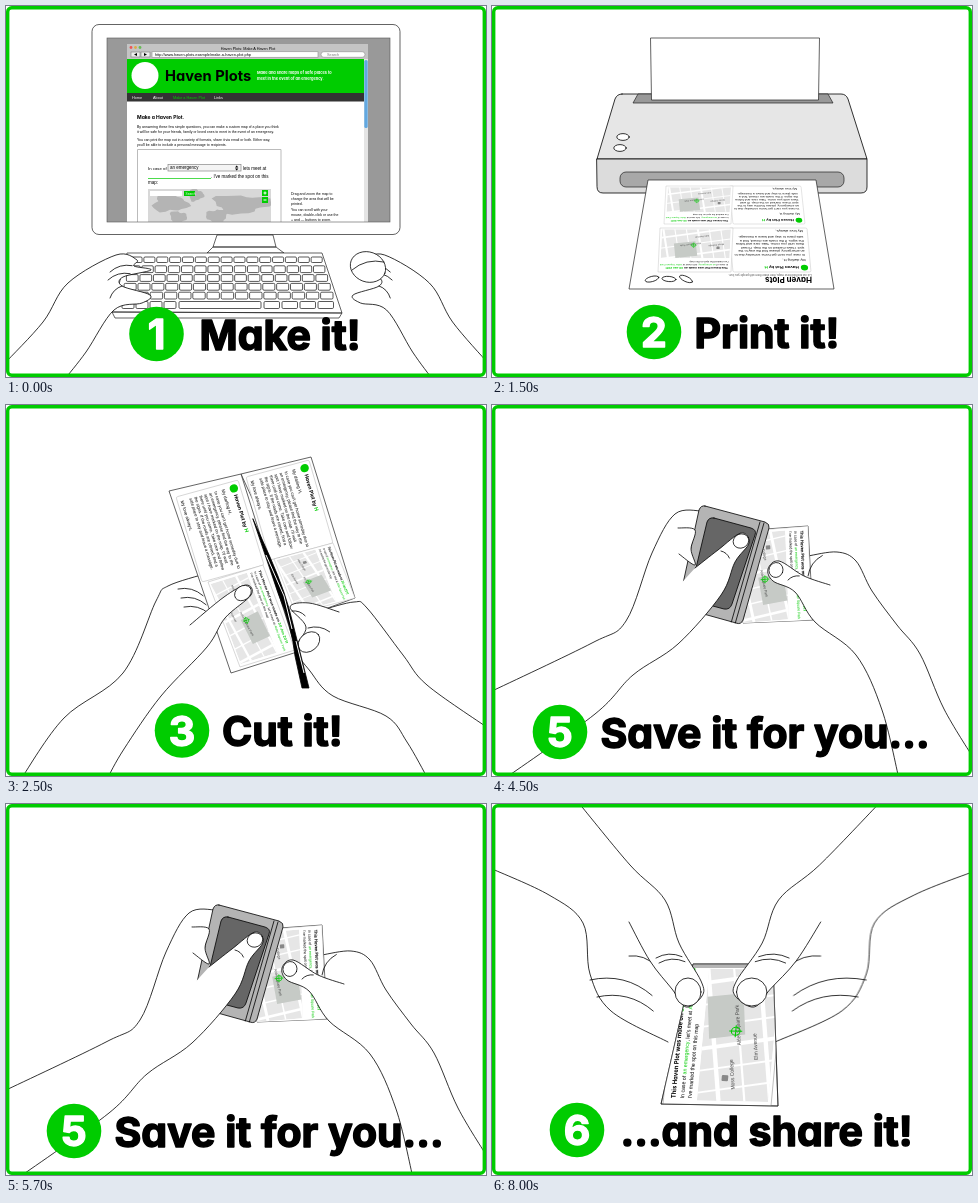
Animation of 480 by 371 pixels, one loop 9000 ms. Source, as an HTML page:

```html
<!DOCTYPE html>
<html lang="en">
<head>
<meta charset="utf-8">
<title>Six steps</title>
<style>
html, body { margin: 0; width: 100%; height: 100%; overflow: hidden; background: #fff; }
#stage { display: block; width: 100vw; height: 100vh; }
.scene { opacity: 0; }
.ink { stroke: #000; stroke-width: .8; stroke-linecap: round; vector-effect: non-scaling-stroke; }
text { font-family: "Liberation Sans", Arial, sans-serif; white-space: pre; }
.bold { font-family: Inter, sans-serif; font-weight: 700; font-feature-settings: "cv11"; }
.title { font-size: 41px; stroke: #000; stroke-width: 1.5; stroke-linejoin: round; }
.digit { font-size: 41px; fill: #fff; stroke: #fff; stroke-width: 1.4; stroke-linejoin: round; text-anchor: middle; }
</style>
</head>
<body>
<svg id="stage" viewBox="0 0 480 371" preserveAspectRatio="none"></svg>
<script>
const GREEN = '#00cc00';
const LOOP = 9000;
let clipCount = 0;

const repeat = (n, draw) => Array.from({ length: n }, (_, i) => draw(i)).join('');
const rect = (x, y, w, h, fill, extra = '') =>
  `<rect x="${x}" y="${y}" width="${w}" height="${h}" fill="${fill}" ${extra}/>`;
const box = (x, y, w, h, fill = '#fff', r = 0, line = '#222') =>
  rect(x, y, w, h, fill, `rx="${r}" stroke="${line}" stroke-width=".7"`);
const poly = (points, fill = '#fff') =>
  `<polygon points="${points}" fill="${fill}" stroke="#222" stroke-width=".7" stroke-linejoin="round"/>`;
const text = (x, y, size, str, extra = '') =>
  `<text x="${x}" y="${y}" font-size="${size}" ${extra}>${str}</text>`;
const bold = (x, y, size, str, extra = '') => text(x, y, size, str, `class="bold" ${extra}`);
const paragraph = (x, y, size, step, list) => list.map((s, i) => text(x, y + i * step, size, s)).join('');
const green = str => `<tspan fill="${GREEN}">${str}</tspan>`;
const group = (transform, content) => `<g transform="${transform}">${content}</g>`;
const mirror = (offset, scale, content) => group(`matrix(${-scale},0,0,1,${offset},0)`, content);

// Smooth open outline through "x,y x,y ..." key points
function outline(points, fill = '#fff') {
  const p = points.split(' ').map(s => s.split(',').map(Number));
  let d = `M${p[0]}`;
  for (let i = 0; i < p.length - 1; i++) {
    const b = p[i], c = p[i + 1], a = p[i - 1] || b, e = p[i + 2] || c;
    d += `C${b.map((v, k) => v + (c[k] - a[k]) / 6)} ${c.map((v, k) => v - (e[k] - b[k]) / 6)} ${c}`;
  }
  return `<path class="ink" d="${d}" fill="${fill}"/>`;
}
// A bent skin line, and a finger nail
const crease = (x, y, angle, length) => group(`translate(${x} ${y}) rotate(${angle})`,
  `<path class="ink" fill="none" d="M0 0Q${length / 2} ${-length / 4} ${length} 0"/>`);
const nail = (x, y, rx, ry, angle = 0) =>
  `<ellipse class="ink" cx="${x}" cy="${y}" rx="${rx}" ry="${ry}" fill="#fff" transform="rotate(${angle} ${x} ${y})"/>`;

function clipped(points, content) {
  const id = `clip${clipCount++}`;
  return `<clipPath id="${id}"><polygon points="${points}"/></clipPath><g clip-path="url(#${id})">${content}</g>`;
}
// Lays a 140 by 100 panel on the page by its top left, top right and bottom left corners
function lay(panel, [ox, oy], [rx, ry], [bx, by]) {
  const m = [(rx - ox) / 140, (ry - oy) / 140, (bx - ox) / 100, (by - oy) / 100, ox, oy];
  return group(`matrix(${m})`, panel);
}

function caption(digit, cx, cy, x, words) {
  return `<circle cx="${cx}" cy="${cy}" r="27.3" fill="${GREEN}"/>` +
    `<text class="bold digit" x="${cx}" y="${cy + 15}">${digit}</text>` +
    `<text class="bold title" x="${x}" y="${cy + 15.6}">${words}</text>`;
}

function mapPanel() {
  const road = (x1, y1, x2, y2, w) => `<path d="M${x1} ${y1}L${x2} ${y2}" stroke="#fff" stroke-width="${w}"/>`;
  const label = (x, y, str) => text(x, y, 5, str, `fill="#444" transform="rotate(-8 ${x} ${y})"`);
  const map = rect(0, 0, 132, 66, '#e6e6e6') +
    repeat(8, i => road(i * 22 - 14, 0, i * 22 - 2, 70, i % 3 ? 2 : 4)) +
    repeat(4, i => road(0, i * 24 - 4, 140, i * 24 - 26, i % 2 ? 4 : 2)) +
    '<path d="M62 6L104 1L108 34L67 39Z" fill="#c6cac6"/>' +
    label(56, 36, 'Alder Square Park') + label(12, 34, 'Moss College') + label(42, 53, 'Elm Avenue') +
    rect(20, 21, 6, 6, '#888', 'rx="1"') +
    `<g fill="none" stroke="${GREEN}"><circle cx="70" cy="30" r="4"/><path d="M64 30h12M70 24v12"/></g>`;
  return box(0, 0, 140, 100, '#fff', 0, '#aaa') +
    bold(6, 11, 5.9, `This Haven Plot was made on ${green('30 Jan 2011')}`) +
    text(6, 19, 5.2, `In case of ${green('an emergency')}, let's meet at ${green('Alder Square Park')}`) +
    text(6, 26, 5.2, "I've marked the spot on this map") +
    `<svg x="4" y="31" width="132" height="66" viewBox="0 0 132 66">${map}</svg>`;
}

function notePanel() {
  return box(0, 0, 140, 100, '#fff', 3, '#aaa') +
    `<circle cx="11" cy="10" r="6.5" fill="${GREEN}"/>` +
    bold(21, 13, 8, `Haven Plot by ${green('H')}`) + text(8, 29, 7, 'My darling H,') +
    paragraph(8, 41, 6.6, 8, [
      "In case you can't get home someday due to", 'an emergency, please find the way to the',
      "spot I have marked on the map. I'll wait", 'there until you come. Take care and follow',
      'the signs. If the roads are closed, find a', 'safe place to stay and leave a message.']) +
    text(8, 95, 7, 'My love always,');
}

function worldMap() {
  const land = (cx, cy, rx, ry) => {
    const points = Array.from({ length: 24 }, (_, i) => {
      const a = i * Math.PI / 12, r = 1 + .2 * Math.sin(3 * a + cx) + .1 * Math.sin(7 * a);
      return [cx + rx * r * Math.cos(a), cy + ry * r * Math.sin(a)];
    });
    return `<polygon points="${points}" fill="#b4b4b4"/>`;
  };
  return rect(142, 183, 123, 33, '#d8d8d8') +
    clipped('142,183 265,183 265,215.5 142,215.5',
      land(164, 197, 17, 9) + land(172, 212, 8, 7) + land(190, 189, 7, 6) + land(235, 198, 28, 9) + land(211, 211, 10, 8)) +
    rect(144, 185, 32, 5, '#fff') + rect(178, 185, 11, 5, GREEN) + text(179.5, 189, 3.2, 'Search', 'fill="#fff"') +
    repeat(2, i => rect(256, 184 + i * 7, 6, 6, GREEN) + `<path d="M257.5 ${187 + i * 7}h3" stroke="#fff"/>`) +
    '<path d="M259 185.5v3" stroke="#fff"/>';
}

function website() {
  const menu = (x, str, fill = '#fff') => text(x, 92.6, 3.8, str, `fill="${fill}"`);
  return rect(101, 32, 283, 184, '#999') + rect(121, 38, 241, 178, '#fff') + rect(121, 38, 241, 15, '#c4c4c4') +
    ['#e55', '#da4', '#6b5'].map((c, i) => `<circle cx="${125 + i * 4.5}" cy="41.5" r="1.4" fill="${c}"/>`).join('') +
    text(242, 43.6, 3.8, 'Haven Plots: Make A Haven Plot', 'text-anchor="middle"') +
    repeat(2, i => box(125 + i * 10, 46, 9, 5, '#eee', 0, '#888')) +
    '<path d="M131 47v3l-3-1.5zM138 47v3l3-1.5z"/>' +
    box(146, 45.7, 166, 5.6, '#fff', 0, '#999') + text(149, 50, 3.9, 'http://www.haven-plots.example/make-a-haven-plot.php') +
    box(315, 45.7, 44, 5.6, '#fff', 2.8, '#999') + text(321, 50, 3.8, 'Search', 'fill="#777"') +
    rect(121, 53, 237, 34, GREEN) + '<circle cx="139" cy="69.5" r="13.5" fill="#fff"/>' +
    bold(159, 74.5, 14.7, 'Haven Plots') +
    bold(251, 68, 3.9, 'Make and share maps of safe places to', 'fill="#fff"') +
    bold(251, 73.7, 3.9, 'meet in the event of an emergency.', 'fill="#fff"') +
    rect(121, 87, 237, 8.5, '#333') +
    menu(126, 'Home') + menu(147, 'About') + menu(167, 'Make a Haven Plot', GREEN) + menu(208, 'Links') +
    rect(358, 53, 4, 163, '#e4e4e4') + rect(358.3, 54, 3.4, 68, '#62a8e0', 'rx="1.5"') +
    bold(131, 113, 5, 'Make a Haven Plot.') +
    paragraph(131, 121.5, 3.5, 5.5, [
      'By answering these few simple questions, you can make a custom map of a place you think',
      'it will be safe for your friends, family or loved ones to meet in the event of an emergency.']) +
    paragraph(131, 134.5, 3.5, 5.5, [
      'You can print the map out in a variety of formats, share it via email or both. Either way,',
      "you'll be able to include a personal message to recipients."]) +
    '<path d="M131.5 216V143.5H275V216" fill="none" stroke="#bbb"/>' +
    text(142, 163.5, 4.3, 'In case of') + box(162, 158.5, 73, 6.5, '#f4f4f4', 0, '#888') +
    text(164, 163.4, 4.5, 'an emergency') + '<path d="M229 161.4l1.7-2 1.7 2zM229 162.4l1.7 2 1.7-2z"/>' +
    text(237, 163.5, 4.5, 'lets meet at') +
    `<path d="M142 172.5H205" stroke="${GREEN}" stroke-width=".7"/>` +
    text(205, 171.5, 4.5, ". I've marked the spot on this") + text(142, 178, 4.5, 'map:') + worldMap() +
    paragraph(285, 188.5, 3.5, 5, ['Drag and zoom the map to', 'change the area that will be', 'printed.']) +
    paragraph(285, 205, 3.5, 4.8, ['You can scroll with your', 'mouse, double-click or use the', '+ and — buttons to zoom.']);
}

function keyboard() {
  const key = (x, y, w, h) => box(x, y, w, h, '#fff', 1.2, '#111');
  const row = r => repeat(15, i => {
    const step = (193 + r * 5) / 15;
    return key(125 - r * 2.3 + i * step, 251 + r * 8.8, step - 1.8, r ? 6.8 : 5.5);
  });
  return poly('121,247 316,247 336,307 333,312 109,312 106,306') + poly('106,306 336,307') + repeat(5, row) +
    repeat(4, i => key(116 + i * 14, 295.5, 12, 7) + key(258 + i * 18, 295.5, 15.5, 7)) + key(173, 295.5, 82, 7);
}

function makeScene() {
  const hand = outline('-2,358 37,316 62,277 110,249 131,254 128,260 145,264 117,271 116,280 144,289 136,297 108,304 80,346 58,374') +
    repeat(2, i => crease(104 - i * 2, 266 + i * 8, -16, 23)) + crease(104, 292, -45, 17);
  return box(86, 18.5, 308, 210, '#fff', 7) + website() + rect(101, 32, 283, 184, 'none', 'stroke="#555" stroke-width=".6"') +
    poly('211,229 267,229 270,241 278,247 201,247 207,241') + poly('207,241 270,241') +
    keyboard() + hand + mirror(481, .93, hand) +
    nail(362, 261, 18, 15, 20) + crease(346, 264, -14, 33) +
    caption(1, 150.5, 328, 193.5, 'Make it!');
}

function printScene() {
  const paper = '156,174 324,174 342,283 137,283';
  const sheetRow = i => {
    const y = 218 + 48 * i, top = y - 38 - 6 * i, right = 313 + 6 * i, left = 172 - 6 * i;
    return lay(notePanel(), [right, y], [241, y], [right - 4, top]) +
      lay(mapPanel(), [239, y], [left, y], [241, top]);
  };
  return '<path class="ink" d="M130 88H349Q354 88 356 93L375 153H105L123 93Q125 88 130 88Z" fill="#e6e6e6"/>' +
    poly('146,88 336,88 341,97 141,97', '#999') + poly('158.5,32 327.5,32 326.5,94 159.5,94') +
    '<path class="ink" d="M105 153H375V181Q375 187 369 187H111Q105 187 105 181Z" fill="#dcdcdc"/>' +
    repeat(2, i => nail(131 - i * 3, 131 + i * 11, 6.2, 3.4)) +
    box(128, 166, 224, 15, '#a8a8a8', 6) + poly(paper) + clipped(paper, repeat(2, sheetRow)) +
    group('translate(320 271) rotate(180)', bold(0, 0, 8, 'Haven Plots') +
      text(0, 3, 2.8, 'Cut out and fold these maps, then share them with people you love.', 'fill="#555"')) +
    repeat(3, i => nail(160 + i * 17, 273, 7, 2.6, i * 20 - 15)) +
    caption(2, 162, 326, 202.5, 'Print it!');
}

function cutScene() {
  return outline('15,374 58,313 117,268 150,196 162,181 202,168') +
    repeat(3, i => crease(172 + i * 3, 184 + i * 9, 15, 26)) +
    outline('316,205 348,197 361,203 397,250 421,280 482,323') +
    poly('235,69 305,52 349,193 300,211') + poly('163,86 235,69 291,247 225,268') +
    lay(notePanel(), [303, 55], [327, 138], [240, 72]) + lay(mapPanel(), [327, 138], [349, 193], [268, 154]) +
    lay(notePanel(), [232, 75], [258, 160], [170, 92]) + lay(mapPanel(), [257, 160], [289, 245], [202, 177]) +
    outline('184,220 218,192 240,180 245,190 219,213 201,242 155,291 118,344 101,374') + nail(237, 188, 9, 7, -35) +
    outline('333,207 303,198 284,202 300,222 290,244 304,266 327,291 380,311 401,337 422,374') +
    nail(303, 237, 12, 9, -40) + crease(302, 223, 10, 22) + crease(286, 206, 20, 14) +
    '<path class="ink" d="M247 114L264 152Q280 188 287 219L303 283H296L289 251Q286 222 272 188Z"/>' +
    '<path d="M260 150L278 191L286 224M290 236L298 268" fill="none" stroke="#fff"/>' +
    caption(3, 176, 325.5, 216, 'Cut it!');
}

function foldScene() {
  const bothHands = part => part + group('rotate(-9 256 138)', mirror(485, 1, part));
  const fingers = outline('-2,345 80,251 113,174 126,131 180,108 230,122') +
    repeat(3, i => crease(154 + i * 4, 144 + i * 8, -10, 46 - i * 4)) + crease(198, 112, 35, 16);
  const thumb = outline('150,221 182,198 205,151 228,126 238,138 213,165 190,199 150,242 105,320 40,428') +
    nail(228, 136, 10, 8, -25) + repeat(2, i => crease(195 + i * 3, 150 - i * 3, 55, 10));
  return bothHands(fingers) + poly('200,123 284,121 290,236 207,241') +
    lay(mapPanel(), [284, 121], [290, 235], [201, 123]) +
    poly('200,123 284,121 284,124 201,127', '#bbb') + bothHands(thumb) +
    caption(4, 164, 327, 206.5, 'Fold it!');
}

function saveScene() {
  const card = '274,124 316,121 321,215 251,218';
  return outline('316,151 345,147 364,156 380,186 405,220 428,249 452,304 482,354') +
    poly(card) + clipped(card, lay(mapPanel(), [316, 121], [320, 215], [242, 127])) +
    outline('-2,287 100,238 134,216 160,148 183,109 210,106') +
    '<path class="ink" d="M213 101L273 117Q278 119 277 123L251 215Q249 220 244 218L190 203Q186 201 187 197L207 105Q209 100 213 101Z" fill="#b4b4b4"/>' +
    '<path class="ink" d="M222 113L259 123Q265 125 263 130L240 199Q238 205 232 204L202 196Q196 194 198 188L215 117Q217 112 222 113Z" fill="#666"/>' +
    repeat(2, i => crease(268 + i * 4, 117 + i, 106, 104).replace(/-26/, '0')) +
    outline('186,123 203,125 199,144 203,160 187,149') +
    outline('203,163 226,145 249,128 257,138 243,157 229,190 186,239 141,270 103,309 12,374') +
    nail(249, 136, 8, 7, -25) + crease(229, 146, 40, 11) +
    outline('338,180 312,171 287,156 276,164 281,176 303,187 323,217 364,250 390,305 407,374') +
    nail(284, 165, 7, 7.5, 20) + crease(296, 175, -20, 12) + crease(316, 171, -55, 25) +
    caption(5, 68, 327, 108.5, 'Save it for you...');
}

function shareScene() {
  const card = '201,160 281,160 286,302 169,300';
  const bothHands = part => part + mirror(489, 1.17, part);
  const fingers = outline('-2,64 57,91 91,119 98,170 119,207 176,238') +
    crease(98, 176, 14, 64) + crease(105, 193, 14, 58) + crease(137, 152, 20, 28);
  const thumb = outline('86,-2 138,61 173,96 187,139 209,177 210,192 194,203 180,185 158,157 137,118') +
    nail(196, 188, 13, 14) + repeat(2, i => crease(164 + i * 3, 154 + i * 5, -3, 26));
  return bothHands(fingers) + poly(card) +
    clipped(card, lay(mapPanel(), [171, 300], [184, 160], [279, 302]) + rect(200, 160, 82, 4, '#b5b5b5')) +
    poly(card, 'none') + bothHands(thumb) +
    caption(6, 85, 326, 128.5, '...and share it!');
}

const timeline = [
  [makeScene, 1500], [printScene, 1000], [cutScene, 1000],
  [foldScene, 1000], [saveScene, 2000], [shareScene, 2500]
];
const stage = document.getElementById('stage');
stage.innerHTML = timeline.map(([draw]) => `<g class="scene">${draw()}</g>`).join('') +
  rect(1.7, 1.7, 476.6, 367.6, 'none', `rx="4" stroke="${GREEN}" stroke-width="3.4"`);

let start = 0;
stage.querySelectorAll('.scene').forEach((scene, i) => {
  const hold = timeline[i][1];
  scene.animate([
    { opacity: 1, offset: 0, easing: 'step-end' },
    { opacity: 0, offset: hold / LOOP },
    { opacity: 0, offset: 1 }
  ], { duration: LOOP, iterations: Infinity, delay: start });
  start += hold;
});
</script>
</body>
</html>
```
